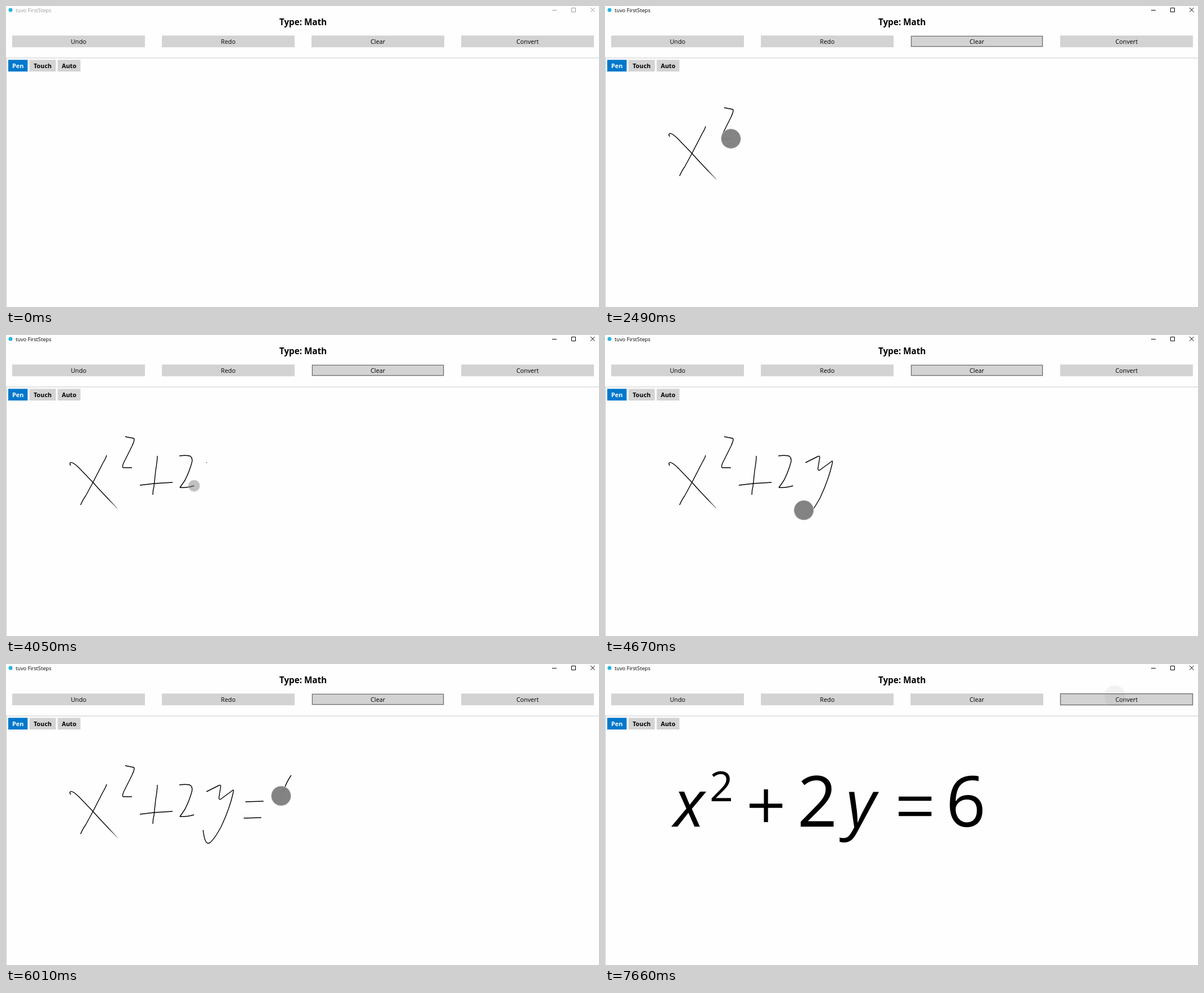
Recreate the animation shown at these times as an HTML page. Size 1050x533 px, loop 8000 ms.

```html
<!DOCTYPE html>
<html lang="en">
<head>
<meta charset="utf-8">
<title>Handwriting to math</title>
<style>
html, body { margin: 0; width: 100%; height: 100%; overflow: hidden; background: #fefefe; }
svg { display: block; width: 100vw; height: 100vh; font: 10.8px "Open Sans", "Noto Sans", sans-serif; }
.mid { text-anchor: middle; }
.bold { font-weight: 700; }
.line { fill: none; stroke: #000; }
#math { font-size: 124px; }
</style>
</head>
<body>
<svg viewBox="0 0 1050 533">
  <defs>
    <linearGradient id="tail" gradientUnits="userSpaceOnUse" x1="180" y1="291" x2="197" y2="308">
      <stop stop-color="#000"/><stop offset="1" stop-color="#bbb"/>
    </linearGradient>
  </defs>

  <circle id="glow" r="9" fill="#fff27a"/>
  <circle cx="8" cy="7" r="3.5" fill="#25b4e0"/>
  <g id="caption">
    <text x="17" y="10.5" font-size="9.2" fill="currentColor">tuvo FirstSteps</text>
    <path d="M967 7.5h8M1001.500 3.500h7v7h-7zM1035 3l7.500 7.500M1042.500 3l-7.500 7.500" fill="none" stroke="currentColor"/>
  </g>
  <text class="mid bold" x="526" y="33.5" font-size="15.2">Type: Math</text>
  <g id="buttons"></g>
  <path d="M0.500 533V92H1050" fill="none" stroke="#c9c9c9"/>
  <g id="tools" class="bold"></g>

  <rect id="clearFocus" class="line" x="542.5" y="53.5" width="232" height="18" stroke-dasharray="1 1"/>
  <rect id="convertFocus" class="line" x="806.5" y="52.7" width="234" height="19.8" style="stroke:#707070;stroke-width:1.4"/>

  <g id="ink" class="line" stroke-width="1.4" stroke-linejoin="round"></g>
  <g id="math" class="mid">
    <text x="149" y="288" font-size="115" font-style="italic">x</text>
    <text x="206" y="243" font-size="73">2</text>
    <text x="376" y="288">2</text>
    <text x="453" y="288" font-size="115" font-style="italic">y</text>
    <text x="639" y="288">6</text>
    <path class="line" stroke-width="7.3" d="M256 251h58M285 222v58M520 238.500h58M520 265.500h58"/>
  </g>
  <circle id="touch" fill="#808080" stroke="#d8d8d8"/>
</svg>
<script>
const LOOP = 8000, ACTIVE = 1020, CONVERT = 7460, LAST = 7660, FADE = 220, RADIUS = 17.5;
const $ = id => document.getElementById(id);
const show = (el, on) => el.style.display = on ? '' : 'none';

function add(parent, tag, attrs, text = '') {
  const el = document.createElementNS('http://www.w3.org/2000/svg', tag);
  for (const key in attrs) el.setAttribute(key, attrs[key]);
  el.textContent = text;
  return parent.appendChild(el);
}

function button(parent, label, x, y, width, height, fill, color) {
  add(parent, 'rect', { x, y, width, height, fill });
  add(parent, 'text', { x: x + width / 2, y: y + height / 2 + 4, fill: color, class: 'mid' }, label);
}

['Undo', 'Redo', 'Clear', 'Convert'].forEach((label, i) =>
  button($('buttons'), label, 11 + 265 * i, 52.3, 235, 20.8, '#d3d3d3', '#000'));
button($('tools'), 'Pen', 4, 95.3, 34.3, 20.7, '#0078cc', '#fff');
button($('tools'), 'Touch', 41.5, 95.3, 46.7, 20.7, '#d3d3d3', '#000');
button($('tools'), 'Auto', 91.5, 95.3, 40.3, 20.7, '#d3d3d3', '#000');

// Each contact: touch down, lift, path
const contacts = [
  [1020, 1250, 'M115 231Q112 229 114 226Q117 224 128 234L153 260Q170 279 197 307'],
  [1690, 1960, 'M178 213Q178 216 172 226L154 261L141 285Q137 290 132 301'],
  [2120, 2490, 'M211 180L226 183Q229 184 223 197L208 227Q205 235 208 235L223 235'],
  [2680, 2890, 'M237 266L262 263L295 261'],
  [3060, 3280, 'M268 214Q268 222 265 240L262 268Q260 275 260 283'],
  [3480, 3940, 'M307 214Q322 212 327 215Q331 219 329 226Q325 241 317 257Q311 266 308 270Q318 271 333 267'],
  [4040, 4800, 'M355 226L377 215Q381 213 380 218L377 237Q377 242 382 238L401 224Q404 221 402 229' +
               'Q396 256 381 288Q368 312 360 317Q352 321 349 294'],
  [4980, 5150, 'M424 244L456 243'],
  [5300, 5475, 'M421 273L452 272'],
  [5800, 6470, 'M505 197Q498 207 492 222Q478 254 477 268Q477 284 484 288Q494 291 503 288' +
               'Q510 283 505 271Q496 252 487 253Q482 254 481 260'],
  [7250, CONVERT, 'M903 57h.1']
].map(([start, end, d]) => {
  const path = add($('ink'), 'path', { d });
  return { start, end, path, length: path.getTotalLength() };
});
contacts[0].path.setAttribute('stroke', 'url(#tail)');

const glows = [1250, 2000, 4830, 5440];

function draw(t) {
  const active = t >= ACTIVE, converted = t >= CONVERT;
  $('caption').style.color = active ? '#000' : '#999';
  show($('clearFocus'), active && !converted);
  show($('convertFocus'), converted);
  show($('math'), converted);
  show($('ink'), !converted);
  show($('glow'), glows.some(g => t >= g && t < g + 120));

  let touch = null;
  for (const c of contacts) {
    const u = Math.min(1, Math.max(0, (t - c.start) / (c.end - c.start)));
    const drawn = c.length * u * u * (3 - 2 * u);
    show(c.path, t >= c.start);
    c.path.setAttribute('stroke-dasharray', `${Math.max(1, drawn)} ${c.length + 9}`);
    if (t >= c.start + 40 && t < c.end + FADE) touch = { c, drawn };
  }
  show($('touch'), touch);
  if (!touch) return;
  const { c, drawn } = touch;
  const fade = Math.max(0, (t - c.end) / FADE);
  const tap = c.length < 1;
  const { x, y } = c.path.getPointAtLength(drawn);
  $('touch').setAttribute('cx', x);
  $('touch').setAttribute('cy', y);
  $('touch').setAttribute('r', RADIUS + fade * (tap ? 2 : -14));
  $('touch').setAttribute('opacity', 0.97 * (1 - fade));
}

function tick() {
  draw(Math.min(LAST, performance.now() % LOOP));
  requestAnimationFrame(tick);
}
tick();
</script>
</body>
</html>
```
